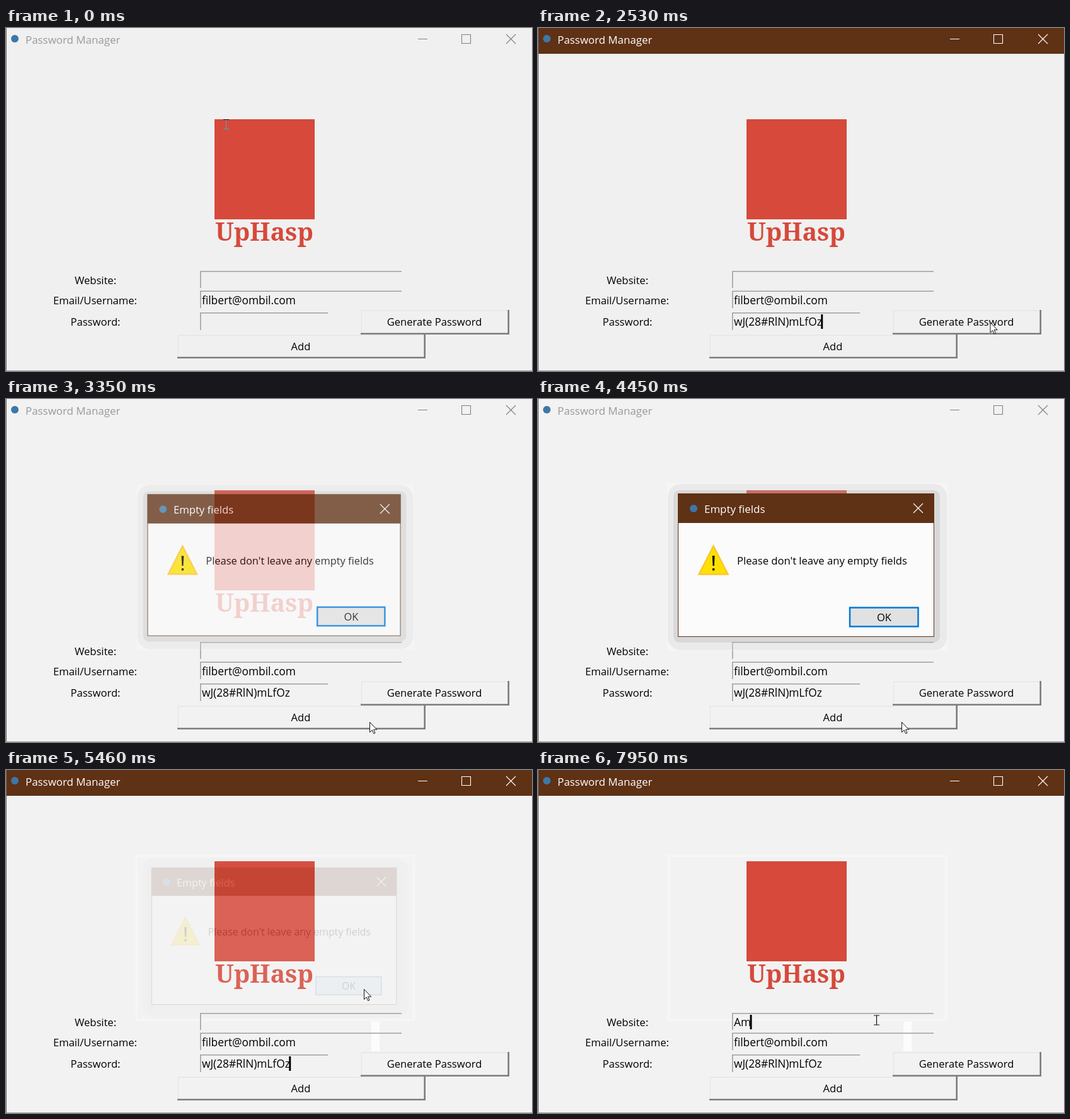
Write an HTML page that moves like this. It is 835x545 px and loops after 8000 ms.

```html
<!DOCTYPE html>
<html lang="en">
<head>
<meta charset="utf-8">
<title>Password Manager</title>
<style>
html, body { margin: 0; width: 100%; height: 100%; overflow: hidden; background: #f0f0f0 }
svg { display: block; width: 835px; height: 545px }
text { font: 16.6px "Open Sans", "Noto Sans", sans-serif; fill: #000 }
.mid { text-anchor: middle }
.entry { font-size: 17.3px }
.title { font-size: 16.9px }
.brand { font: bold 39.5px "Noto Serif", serif; fill: #d6493b }
.line { fill: none; stroke: #a0a0a0; stroke-width: 1.6 }
.btn path { fill: none }
.btn .lit, .btn.down .dim { stroke: #e6e6e6; stroke-width: 1.5 }
.btn .dim, .btn.down .lit { stroke: #7c7c7c; stroke-width: 2.6 }
.btn.down text { transform: translate(2px, 1px) }
#bar { fill: none }
#win text { fill: #999 }
#win path { fill: none; stroke: #808080; stroke-width: 1.1 }
#win.on #bar { fill: #5f3115 }
#win.on text { fill: #fff }
#win.on path { stroke: #fff }
#dialog { transform-origin: 425.5px 264px }
</style>
</head>
<body>
<svg viewBox="0 0 835 545">
  <rect id="bg" width="835" height="545"/>
  <g id="win">
    <rect id="bar" width="835" height="41"/>
    <circle cx="14" cy="17" r="6" fill="#3c78a8"/>
    <text class="title" x="31" y="25">Password Manager</text>
    <path d="M654 17.5h15M723.5 10.5h14v14h-14zM794 10l15 15M809 10l-15 15"/>
  </g>

  <rect x="331" y="145" width="159" height="159" fill="#d6493b"/>
  <text class="brand mid" x="410" y="338">UpHasp</text>

  <rect id="ghost" x="207.5" y="136.5" width="440" height="261" fill="none" stroke="#f6f6f6" stroke-width="4"/>
  <rect id="streak" x="580" y="400" width="13" height="47" fill="#fcfcfc"/>

  <g id="form">
    <text class="mid" x="142" y="407">Website:</text>
    <text class="mid" x="141.5" y="439">Email/Username:</text>
    <text class="mid" x="142" y="473">Password:</text>
    <path class="line" d="M308.8 413V386.8H628M308.8 445V418.3H628M308.8 480V452.8H511"/>
    <text class="entry" id="site" x="311" y="407"></text>
    <text class="entry" x="311" y="439">filbert@ombil.com</text>
    <text class="entry" id="pass" x="311" y="473"></text>
    <rect id="caret" width="3" height="23"/>
  </g>

  <path d="M.5 0V545" stroke="#707070"/>
  <path d="M0 544.5H835" stroke="#a0a0a0"/>

  <g id="dialog">
    <rect x="205" y="134" width="445" height="266" fill="#fff" opacity=".3"/>
    <rect x="206" y="135" width="443" height="264" rx="20" opacity=".05"/>
    <rect x="215" y="145" width="423" height="242" rx="10" opacity=".08"/>
    <rect x="222.5" y="150.5" width="406" height="227" fill="#fbfbfb" stroke="#5f3115"/>
    <rect x="222" y="150" width="407" height="47" fill="#5f3115"/>
    <circle cx="247" cy="174" r="6" fill="#3c78a8"/>
    <text class="title" x="264" y="181" style="fill:#fff">Empty fields</text>
    <path d="M596 166l15 15M611 166l-15 15" stroke="#fff" stroke-width="1.2"/>
    <path d="M278.5 233.5L301.5 278.5H255.5Z" fill="#ffe000" stroke="#fcc62e" stroke-width="2.5"/>
    <path d="M276.7 249h3.8l-.8 16h-2.2zM277 269h3.2v3.5H277z"/>
    <text x="316" y="263">Please don't leave any empty fields</text>
    <rect id="ok" x="495" y="331.5" width="108.5" height="30"/>
    <text class="mid" x="549.5" y="353">OK</text>
  </g>

  <g id="mark">
    <path d="M345 145.5h9" stroke="#111"/>
    <path d="M349.5 146v14M345 160.5h9" stroke="#29b6c3"/>
  </g>
  <path id="arrow" d="M.5.5V16.5L4.2 13L6.7 18.6L9 17.6L6.6 12.2H11.7Z" fill="#fff" stroke="#111"/>
  <path id="beam" d="M-4.5-7.5h9M0-7.5v15M-4.5 7.5h9" fill="none" stroke="#111" stroke-width="1.2"/>
</svg>
<script>
const LOOP = 8000;
const $ = id => document.getElementById(id);
const show = (id, on) => $(id).style.display = on ? '' : 'none';
const within = (t, a, b) => t >= a && t < b;
const clamp = v => Math.max(0, Math.min(1, v));

function addButton(id, x, y, w, h, label, baseline) {
  $('form').insertAdjacentHTML('beforeend', `<g class="btn" id="${id}">
    <path class="lit" d="M${x + 1.3} ${y + h}V${y + 1.3}H${x + w}"/>
    <path class="dim" d="M${x} ${y + h - 1.3}H${x + w - 1.3}V${y}"/>
    <text class="mid" x="${x + w / 2 - 1}" y="${baseline}">${label}</text></g>`);
}
addButton('generate', 563, 448, 236, 39, 'Generate Password', 473);
addButton('add', 272, 487, 394, 38, 'Add', 512);

// Pointer stops: time, x, y
const stops = [
  [350, 350, 152], [840, 719, 467], [2500, 719, 467], [3020, 577, 513],
  [4450, 577, 513], [5200, 568, 348], [5560, 568, 348], [5920, 537.5, 397.5], [LOOP, 537.5, 397.5]
];
function pointer(t) {
  const i = Math.max(1, stops.findIndex(s => s[0] > t));
  const [t0, x0, y0] = stops[i - 1], [t1, x1, y1] = stops[i];
  const p = clamp((t - t0) / (t1 - t0)), e = p * p * (3 - 2 * p);
  return [x0 + (x1 - x0) * e, y0 + (y1 - y0) * e];
}

// The caret blinks 600 ms on, 300 ms off from each focus
function caretOn(t) {
  if (t < 1270 || within(t, 3200, 5300)) return false;
  const start = t < 3200 ? 1260 : t < 5960 ? 5300 : 5960;
  return (t - start) % 900 < 600;
}

function dialogAlpha(t) {
  if (t < 3310 || t >= 5480) return 0;
  return t < 5340 ? 1 - (1 - clamp((t - 3300) / 170)) ** 4 : 1 - (t - 5340) / 140;
}

function draw(t) {
  $('bg').setAttribute('fill', t < 3200 ? '#f0f0f0' : '#f2f2f2');
  $('win').classList.toggle('on', within(t, 1270, 3200) || t >= 5340);
  $('generate').classList.toggle('down', within(t, 1270, 1710));
  $('add').classList.toggle('down', within(t, 3090, 3200));
  $('pass').textContent = t < 1670 ? '' : 'wJ(28#RlN)mLfOz';
  $('site').textContent = t < 7680 ? '' : t < 7950 ? 'A' : 'Am';

  const inSite = t >= 5960, field = $(inSite ? 'site' : 'pass');
  $('caret').setAttribute('x', 309.5 + field.getComputedTextLength());
  $('caret').setAttribute('y', inSite ? 389 : 455);
  show('caret', caretOn(t));

  const a = dialogAlpha(t);
  show('dialog', a > 0);
  $('dialog').style.opacity = a;
  $('dialog').style.transform = `scale(${0.95 + 0.05 * a})`;
  show('ghost', t >= 5340);
  show('streak', t >= 5200);

  const [x, y] = pointer(t);
  const [fill, edge, width] = t >= 5300 ? ['#cae3f7', '#1f66a3', 1.5]
    : t > 4450 && y < 362 ? ['#e5f1fb', '#0078d7', 1.5] : ['#e1e1e1', '#0078d7', 2.5];
  $('ok').setAttribute('fill', fill);
  $('ok').setAttribute('stroke', edge);
  $('ok').setAttribute('stroke-width', width);

  const typing = t > 5560 && y > 386;
  show('mark', t < 350);
  show('arrow', t >= 350 && !typing);
  show('beam', typing);
  for (const id of ['arrow', 'beam']) $(id).setAttribute('transform', `translate(${x} ${y})`);
}

const start = performance.now();
function tick() {
  draw((performance.now() - start) % LOOP);
  requestAnimationFrame(tick);
}
tick();
</script>
</body>
</html>
```
